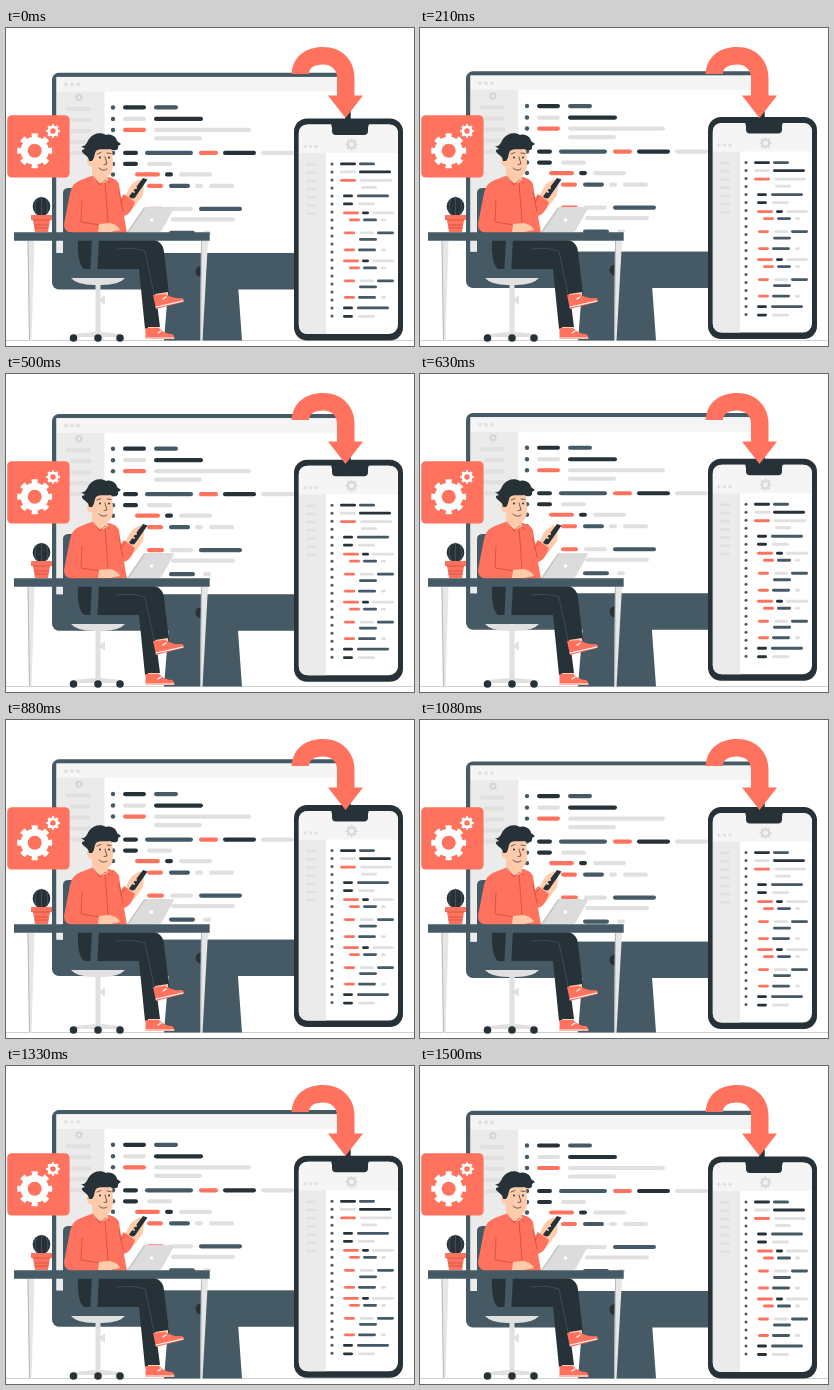
These frames come from a looping animation (408x318 px, 1540 ms). An HTML page:

```html
<!DOCTYPE html>
<html>
<head>
<meta charset="utf-8">
<style>
html, body { margin: 0; width: 100%; height: 100%; overflow: hidden; background: #fff }
svg { display: block; width: 100vw; height: 100vh }
.k { fill: #263238; stroke: #263238 }
.t { fill: #455a64; stroke: #455a64 }
.c { fill: #ff725e; stroke: #ff725e }
.g { fill: #e0e0e0; stroke: #e0e0e0 }
.s { fill: #ffcbaa; stroke: #ffcbaa }
.w { fill: #fff; stroke: #fff }
path, rect, circle, ellipse { stroke-width: 0 }
.line { fill: none; stroke-linecap: round; stroke-linejoin: round }
.thin { fill: none; stroke: #263238; stroke-width: .7; stroke-linecap: round }
.fold { fill: none; stroke: #b94435; stroke-width: .6; stroke-linecap: round }
</style>
</head>
<body>
<svg viewBox="0 0 408 318">
  <path d="M0 312.5H408" stroke="#c4c4c4" style="stroke-width:.8"/>
  <path class="t" d="M163 250H231.5L236 312.5H158Z"/>

  <g id="monitor">
    <rect class="t" x="46" y="44.8" width="298.5" height="216.7" rx="7"/>
    <path class="k" d="M338 44.8Q344.5 46 344.5 52V225H339V49Z"/>
    <rect class="w" x="50.5" y="49" width="288.5" height="176"/>
    <rect x="50.5" y="49" width="288.5" height="14.5" fill="#f5f5f5"/>
    <rect x="50.5" y="63.5" width="48" height="161.5" fill="#ebebeb"/>
    <circle class="k" cx="195" cy="243.5" r="5.5"/>
  </g>

  <!-- app tile and plant -->
  <rect class="c" x="1.2" y="87.2" width="62.4" height="62.4" rx="4.5"/>
  <g id="tile"></g>
  <ellipse class="k" cx="35.5" cy="178.5" rx="8.8" ry="9.5"/>
  <path class="line" d="M31 171Q27 179 31 187M35.5 169V188M40 171Q44 179 40 187" stroke="#455a64" style="stroke-width:.8"/>
  <path class="c" d="M25 187H46V192H44L42 204H29L27 192H25Z"/>
  <path class="fold" d="M27 192H44M29 197H42M29 200H42"/>

  <!-- chair -->
  <path class="t" d="M57 165Q57 160 63 160H72Q78 162 78 170V214H133V236Q133 241 126 241L124 250H66Q57 249 57 238Z"/>
  <path class="g" d="M65 250H119Q113 257 96 257H88Q71 257 65 250Z"/>
  <path class="g" d="M89.5 255H94.5V304L115 306V309H67V306L89.5 304ZM94 271L99 267V277L94 273Z"/>
  <g class="k">
    <circle cx="67.5" cy="310" r="3.8"/><circle cx="92" cy="310" r="3.8"/><circle cx="114" cy="310" r="3.8"/>
  </g>

  <!-- legs and shoes -->
  <path class="k" d="M72 211H143Q157 212 158 224L163 266L150 268L154 299L139 301L133 241H78Q71 236 72 211Z"/>
  <path class="thin" style="stroke:#455a64" d="M111 221Q127 219 139 223L148 266"/>
  <path class="s" d="M149 266L162 264V268L150 270ZM142 299H153V303H142Z"/>
  <path class="c" d="M147 267L159 266Q167 271 176 270Q179 272 177 274L150 281Z"/>
  <path class="c" d="M139.5 300H153Q159 306 166 306Q169 308 168 311H139.5Z"/>
  <path class="line w" style="fill:none;stroke-width:1.2" d="M150 279L177 273M140 310H168M157 271L160 269M152 305L155 303"/>
  <path class="t" d="M86 210H93L91 249H84Z"/>

  <!-- torso and head -->
  <path class="s" d="M118 176Q120 163 126 156L134 151L138 157L137 167L129 178L121 184Z"/>
  <path class="c" d="M88 147L75 152Q66 155 64 165L58 196Q58 204 66 205H121L118 188Q124 186 127 179L129 174L118 166L115 170L113 156Q111 151 103 149Z"/>
  <path class="s" d="M86 138V148Q94 159 102 153L101 143Z"/>
  <path class="s" d="M85 119Q95 112 106 119L107 135Q107 149 97 149Q89 148 86 139Q81 138 81 133Q81 129 86 130Z"/>
  <path class="k" d="M83 133C83 127 75 126 76 122L79 121L75 118C80 119 81 114 83 111C87 105 95 104 100 107C106 105 111 110 111 113L115 116L112 118C113 123 108 123 104 121C99 122 94 120 90 123C88 126 89 130 86 133Z"/>
  <path class="thin" d="M91 126L95 124.5M101 125L105 125.5M99 129L101 136L98 136.5M93 140Q97 144 101 141"/>
  <g class="k"><circle cx="94" cy="129.5" r="1"/><circle cx="103" cy="129.5" r="1"/></g>
  <path class="fold" d="M87 148L94 157L99 152L104 155M99 154L102 194M76 172L75 194L94 197M113 164L117 183M115 174L119 169"/>
  <path class="k" d="M137 150L141.5 151.5L129 169.5Q126 172 123 168.5Z"/>
  <path class="line s" style="fill:none;stroke-width:2" d="M126 158L130 160M125 162L128 164"/>
  <path class="s" d="M93 196L104 195Q112 197 114 202L104 204H92Z"/>

  <!-- desk and laptop -->
  <path d="M21.5 213H28.5L25.5 313H23ZM195 213H202L196.5 313H194Z" fill="#e6e6e6"/>
  <path class="thin" style="stroke:#9ba5aa" d="M22 213L23.5 312M195.5 213L194.5 312"/>
  <path d="M137.5 180Q138.5 179 140 179H166Q169 179 167 182L156 202Q155 204 152 204H121Z" fill="#dcdcdc"/>
  <path d="M137.5 180L121 204H123L140 179Z" fill="#c7c7c7"/>
  <circle class="w" cx="145.5" cy="192" r="1.8"/>
  <path class="t" d="M8 204.3H203.7V212.8H8Z"/>

  <g id="phone">
    <rect class="k" x="288" y="90.5" width="109" height="222" rx="13"/>
    <rect class="w" x="292.8" y="96.5" width="99.2" height="209.5" rx="9"/>
    <path d="M292.8 125V105Q293 96.5 302 96.5H383Q392 96.5 392 105V125Z" fill="#f5f5f5"/>
    <path d="M292.8 125H320V306H302Q293 306 292.8 297Z" fill="#ebebeb"/>
    <path class="k" d="M325 95H364Q362 97 362 100V103Q362 107 358 107H330Q326 107 326 103V100Z"/>
  </g>

  <path class="c" d="M285.5 46C287 28 300 19 317 19C336 19 348.5 32 348.5 50V67.5H357L339.5 90L322 67.5H331V50C331 41 325 36.5 317 36.5C308 36.5 303 40 303 46Z"/>
</svg>
<script>
const monitor = document.getElementById('monitor');
const phone = document.getElementById('phone');
const tile = document.getElementById('tile');

const add = (parent, markup) => parent.insertAdjacentHTML('beforeend', markup);

function bar(parent, tone, x1, x2, y, size) {
  add(parent, `<path class="line ${tone}" style="fill:none;stroke-width:${size}" d="M${x1 + size / 2} ${y}H${x2 - size / 2}"/>`);
}

function dot(parent, x, y, r, tone) {
  add(parent, `<circle class="${tone}" cx="${x}" cy="${y}" r="${r}"/>`);
}

function gear(parent, x, y, r, color) {
  const ring = (radius, width, dash) =>
    `<circle cx="${x}" cy="${y}" r="${radius * r}" fill="none" stroke="${color}" pathLength="16" style="stroke-width:${width * r}" ${dash}/>`;
  add(parent, ring(.6, .4, '') + ring(.87, .26, 'stroke-dasharray="1" stroke-dashoffset=".5"'));
}

// Each row: its height, then bars written as tone, start, end.
function code(parent, size, rows) {
  for (const row of rows.split('/')) {
    const [y, ...bars] = row.trim().split(' ');
    for (const b of bars) {
      const [x1, x2] = b.slice(1).split('-').map(Number);
      bar(parent, b[0], x1, x2, +y, size);
    }
  }
}

code(monitor, 4.2, `79.5 k117-140 t148-172/91 g117-140 k148-197/102 c117-140 g148-245/
  110.5 g148-196/125 k117-132 t139-187 c193-212 k217-250 g255-288/136 k117-132 g141-166/
  146.5 c129-154 k159-167 g173-206/158 c141-157 t163-184 g189-197 g203-228/
  181 c141-158 g164-187 t193-236/191.5 g165-229/205 t163-189 g197-205`);
for (const y of [79.5, 91, 102, 125, 136, 146.5, 158]) dot(monitor, 107, y, 2.2, 't');
for (const [i, x] of [60, 64, 64, 60, 64].entries()) bar(monitor, 'g', x, 85, 81 + i * 11, 4);
for (const x of [60, 66, 72]) dot(monitor, x, 56.5, 1.9, 'g');
gear(monitor, 73, 69.5, 4, '#d5d5d5');

code(phone, 2.8, `136 k334-350 t353-369/144 g334-350 k353-385/152.5 c334-350 g354-386/159.5 g355-371/
  168 k337-347 t351-383/176 k337-347 g352-369/185 c337-353 k356-363 g366-388/
  192 c343-354 t357-371 g375-380/205 c338-349 g354-368 t371-388/211.5 t353-371/
  222 c338-349 t352-370 g375-380/233 c337-353 k356-363 g366-388/240 c343-354 t357-371 g375-380/
  253 c338-349 g354-368 t371-388/259 t353-371/269.5 c338-349 t352-370 g375-380/
  280 k337-347 t351-383/288.5 k337-347 g352-369`);
for (let i = 0; i < 20; i++) dot(phone, 326, 136 + i * 8, 1.5, 't');
for (let i = 0; i < 7; i++) bar(phone, 'g', 300, 310, 136.5 + i * 8.2, 2.6);
for (const x of [299, 304.5, 310]) dot(phone, x, 118.5, 1.7, 'g');
gear(phone, 345.5, 116.5, 6, '#dadada');

gear(tile, 28.7, 122.8, 17.5, '#fff');
gear(tile, 47, 103, 6.8, '#fff');

const LOOP = 1540, LEAD = 40, LIFT = 6;
const start = performance.now();

function draw(now) {
  const turn = (Math.max(0, now - start) + LEAD) / LOOP;
  const y = -LIFT * (1 - Math.cos(2 * Math.PI * turn)) / 2;
  for (const part of [monitor, phone]) part.setAttribute('transform', `translate(0 ${y})`);
  requestAnimationFrame(draw);
}
draw(start);
</script>
</body>
</html>
```
